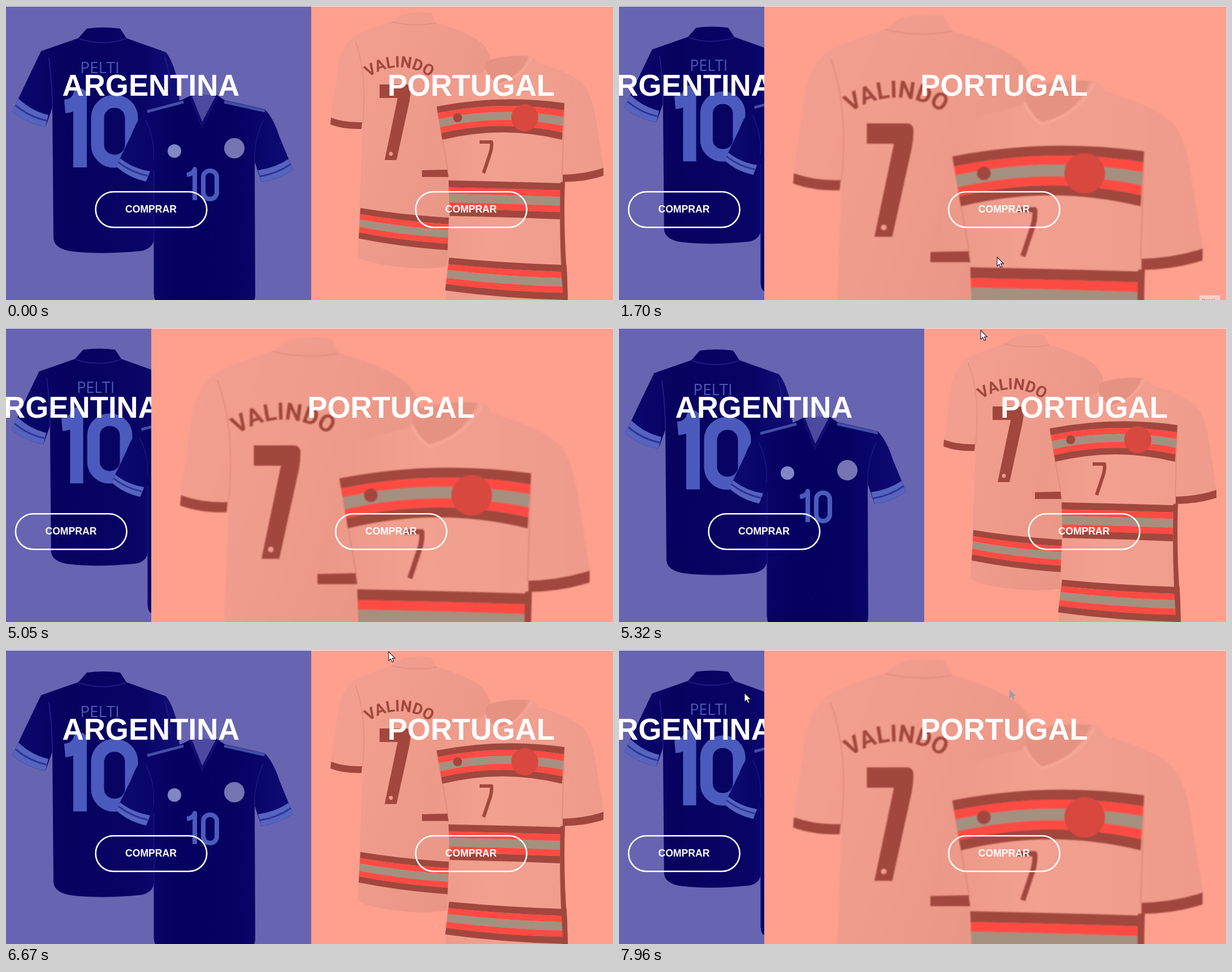
Write an HTML page that moves like this. It is 1074 px wide and 521 px high and loops after 8000 ms.

```html
<!DOCTYPE html>
<html lang="es">
<head>
<meta charset="utf-8">
<title>Camisetas</title>
<style>
  html, body { margin: 0; width: 100%; height: 100%; overflow: hidden; background: #f6f4f8; }
  svg { display: block; width: 100vw; height: 100vh; }
  text { font-family: "Liberation Sans", Arial, sans-serif; }
  .title { font-size: 52.8px; font-weight: 700; fill: #fff; text-anchor: middle; }
  .label { font-size: 17.6px; font-weight: 700; fill: #fff; text-anchor: middle; }
  .pill { fill: none; stroke: #fff; stroke-width: 2.6; }
  .soft { filter: blur(.7px); }
  .digit { fill: none; stroke: #4b5bbd; stroke-linejoin: round; }
  .cuff { fill: #5564be; }
  .trim { fill: #a1473d; }
  .back-name { font-family: "Open Sans", "Noto Sans", sans-serif; font-size: 28px; fill: #4d57b3; text-anchor: middle; }
  .arc-name { font-family: Roboto, "Open Sans", sans-serif; font-size: 28px; font-weight: 700; fill: #a1473d; text-anchor: middle; }
</style>
</head>
<body>
<svg viewBox="0 0 1074 521">
  <defs>
    <linearGradient id="navy" x1="0" x2="1">
      <stop offset="0" stop-color="#0c0970"/><stop offset=".3" stop-color="#07025f"/>
      <stop offset=".75" stop-color="#080465"/><stop offset="1" stop-color="#110e78"/>
    </linearGradient>
    <linearGradient id="navyFront" x1="0" x2="1">
      <stop offset="0" stop-color="#0d0a72"/><stop offset=".35" stop-color="#050160"/>
      <stop offset=".65" stop-color="#060262"/><stop offset="1" stop-color="#0e0b74"/>
    </linearGradient>
    <linearGradient id="rose" x1="0" x2="1" y2=".6">
      <stop offset="0" stop-color="#f3a091"/><stop offset=".5" stop-color="#ef9c8c"/>
      <stop offset="1" stop-color="#e99585"/>
    </linearGradient>
    <linearGradient id="roseFront" x1="0" x2="1">
      <stop offset="0" stop-color="#ec9888"/><stop offset=".4" stop-color="#f2a090"/>
      <stop offset="1" stop-color="#ee9b8b"/>
    </linearGradient>
    <path id="nameArc" d="M640 127Q695 90 752 127"/>
    <path id="arrow" d="M0 0V16L3.8 12.6 6.3 18.3 8.9 17.2 6.5 11.6H11.5Z"/>
  </defs>

  <rect y="1" width="600" height="520" fill="#6765b1"/>
  <g id="leftArt"><g class="soft">
    <path fill="url(#navy)" d="M143 40Q172 36 202 40L213 57 283 82Q296 98 304 135L310 200 262 300V412Q260 430 240 434Q170 441 118 435Q86 431 84 412L82 180 70 214Q38 209 11 187L38 130 62 80 128 57Z"/>
    <path fill="none" stroke="#1f1c86" stroke-width="2" d="M129 58Q172 72 212 58M76 92Q82 140 82 182M281 90Q290 120 290 150"/>
    <path class="cuff" d="M22 164Q45 186 75 193L70 214Q38 209 11 187Z"/>
    <path fill="none" stroke="#2f329a" stroke-width="3" d="M17 176Q42 197 72 203"/>
    <text class="back-name" x="166" y="119">PELTI</text>
    <path class="digit" stroke-width="24" d="M104 178Q126 176 131 158V286"/>
    <rect class="digit" stroke-width="23" x="162" y="169" width="60" height="106" rx="29"/>

    <path fill="url(#navyFront)" d="M312 166L330 157 347 163 372 157 387 167 458 183Q474 200 484 232L508 290Q482 308 452 312L440 276 441 512Q441 524 432 527H272Q262 525 262 512L261 272 248 311Q216 304 195 284L222 228Q234 196 249 186Z"/>
    <path fill="#4c49a0" d="M329 160Q350 154 371 160L347 207Z"/>
    <path fill="none" stroke="#100c70" stroke-width="5" d="M326 160L347 211 374 160"/>
    <path fill="none" stroke="#5967be" stroke-width="5" opacity=".75" d="M250 187L314 170M386 170L458 186"/>
    <path fill="none" stroke="#1b187f" stroke-width="1.5" d="M247 202Q264 236 261 274M455 202Q438 240 440 278M262 290V512"/>
    <path class="cuff" d="M202 270Q224 288 255 293L248 311Q216 304 195 284ZM500 271Q476 287 446 291L452 312Q482 308 508 290Z"/>
    <path fill="none" stroke="#2f329a" stroke-width="3" d="M199 277Q222 295 251 301M504 280Q480 297 449 302"/>
    <circle cx="298" cy="257" r="12" fill="#8186c4"/>
    <circle cx="404" cy="252" r="18" fill="#7675b4"/>
    <path class="digit" stroke-width="8" d="M320 299Q331 298 334 289V344"/>
    <rect class="digit" stroke-width="8" x="349" y="292" width="24" height="50" rx="11.5"/>
  </g></g>
  <g id="leftText">
    <text class="title" x="256.5" y="159">ARGENTINA</text>
    <rect class="pill" x="158.6" y="329.2" width="196.6" height="63" rx="31.5"/>
    <text class="label" x="256.5" y="366">COMPRAR</text>
  </g>

  <rect id="rightBack" y="1" width="1074" height="520" fill="#ffa08f"/>
  <g id="rightArt"><g class="soft">
    <path fill="url(#rose)" d="M682 28L702 14Q728 9 752 12L762 30Q818 46 840 64Q858 80 860 110L800 300 788 460Q755 468 700 463Q635 456 622 443L631 218 630 209Q598 209 574 200Q582 150 587 110Q591 76 612 56Q626 45 682 28Z"/>
    <path fill="none" stroke="#e38e7e" stroke-width="1.5" d="M682 28Q724 38 762 30M618 62Q640 120 631 207"/>
    <path class="trim" d="M575 198Q600 207 630 206L629 218Q598 219 574 210Z"/>
    <text class="arc-name"><textPath href="#nameArc" startOffset="50%">VALINDO</textPath></text>
    <path class="trim" d="M661 139H708Q716 139 716 148Q716 158 714 168L691 273H670L693 163H661Z"/>
    <circle cx="681" cy="262" r="3.4" fill="#ef9c8c"/>
    <g id="backBands"></g>

    <path fill="url(#roseFront)" d="M847 117Q846 98 854 95Q890 84 925 88Q938 91 941 101Q1000 117 1022 139Q1035 154 1042 190L1058 290 1057 301 985 312 991 521H778L785 340 782 302 736 303V290L761 166Q767 140 798 130Z"/>
    <path fill="#e69282" d="M848 116Q846 98 855 96Q890 86 925 89Q908 128 868 139Q852 130 848 116Z"/>
    <path fill="none" stroke="#f5a696" stroke-width="4" d="M847 114Q854 132 868 140Q912 128 930 91"/>
    <path fill="none" stroke="#df8a7a" stroke-width="1.5" d="M762 180Q773 240 782 292M988 174L984 300"/>
    <path class="trim" d="M736 291L781 290 783 303 736 303ZM1057 287V301Q1022 312 985 312V299Q1024 298 1057 287Z"/>
    <g id="frontBands"></g>
    <path class="trim" d="M981 312L989 311Q986 400 993 480L994 521H986Q978 420 981 312Z"/>
    <circle cx="799" cy="198" r="8" fill="#a1473d"/>
    <circle cx="918" cy="198" r="24" fill="#d8483f"/>
    <path fill="none" stroke="#a1473d" stroke-width="6" stroke-linejoin="round" d="M838 241H859Q860 250 857 260L845 296"/>
  </g></g>
  <g id="rightText">
    <text class="title" x="823" y="159">PORTUGAL</text>
    <rect class="pill" x="724.8" y="329.2" width="196.6" height="63" rx="31.5"/>
    <text class="label" x="822.8" y="366">COMPRAR</text>
  </g>

  <g id="tip">
    <rect x="1026.5" y="512.5" width="37.5" height="20" fill="#fff" fill-opacity=".5" stroke="#d9a79d" stroke-opacity=".6"/>
    <text x="1031" y="525" font-size="9" fill="#8a6a64">Panel</text>
  </g>
  <use id="ghost" href="#arrow" x="691" y="70" fill="#98a09f"/>
  <use id="cursor" href="#arrow" fill="#fff" stroke="#1c1c30" stroke-width="1.1" stroke-linejoin="round"/>
</svg>
<script>
  const LOOP = 8000;
  const el = id => document.getElementById(id);
  const lerp = (a, b, k) => a + (b - a) * k;

  // Five stripes between two curves, each given as [left, control, right] heights.
  const COLORS = ['#a1473d', '#fd4b43', '#a59080', '#fd4b43', '#a1473d'];
  const EDGES = [0, .2, .38, .62, .8, 1];
  function bands(x0, x1, top, bottom, skewL = 0, skewR = 0) {
    const edge = k => ({
      l: x0 + skewL * k,
      r: x1 + skewR * k,
      y: top.map((v, i) => lerp(v, bottom[i], k))
    });
    return COLORS.map((color, i) => {
      const a = edge(EDGES[i]), b = edge(EDGES[i + 1]);
      return `<path fill="${color}" d="M${a.l} ${a.y[0]}Q${(a.l + a.r) / 2} ${a.y[1]} ${a.r} ${a.y[2]}` +
        `L${b.r} ${b.y[2]}Q${(b.l + b.r) / 2} ${b.y[1]} ${b.l} ${b.y[0]}Z"/>`;
    }).join('');
  }
  el('backBands').innerHTML = bands(627, 786, [358, 371, 375], [412, 428, 433], -3);
  el('frontBands').innerHTML =
    bands(762, 988, [178, 156, 172], [237, 211, 237], 10, -4) +
    bands(783, 982, [309, 311, 314], [372, 374, 378], 2, -2) +
    bands(784, 992, [446, 456, 459], [504, 519, 521], -7, 2);

  // Pointer moves: start, end, number of steps, way points.
  const MOVES = [
    [1620, 1620, 1, [[730, 505]]],
    [1700, 2120, 7, [[669, 445], [590, 400], [560, 383]]],
    [3510, 4230, 12, [[547, 369], [505, 335], [680, 308], [862, 320]]],
    [4360, 5120, 12, [[840, 290], [720, 110], [650, -30], [650, -30]]],
    [5250, 5730, 7, [[640, 4], [760, 120], [700, -30]]],
    [5880, 6020, 3, [[610, 8], [612, -5], [614, -40]]],
    [6670, 6940, 5, [[677, 3], [740, 80], [838, 106]]],
    [7290, 7560, 5, [[780, 95], [691, 70], [560, 40], [496, 60]]],
    [7820, 7960, 3, [[400, 47], [300, 80], [222, 76]]]
  ];
  // Spans in which the right panel is hovered and wide.
  const WIDE = [[1690, 5120], [5330, 5730], [5880, 6020], [6737, LOOP]];

  function along(points, k) {
    const last = points.length - 1;
    if (!last) return points[0];
    const i = Math.min(Math.floor(k * last), last - 1);
    return points[i].map((v, n) => lerp(v, points[i + 1][n], k * last - i));
  }

  function pointer(t) {
    const move = MOVES.filter(m => m[0] <= t).pop();
    if (!move) return [-50, -50];
    const [start, end, steps, points] = move;
    if (steps === 1) return points[0];
    const gap = (end - start) / (steps - 1);
    const step = Math.min(Math.floor((t - start) / gap), steps - 1);
    return along(points, step / (steps - 1));
  }

  function draw(t) {
    const wide = WIDE.some(([a, b]) => t >= a && t < b);
    const split = wide ? 257 : 540;
    const shift = `translate(${wide ? -141.6 : 0} 0)`;
    el('leftArt').setAttribute('transform', `translate(-27 1) scale(${wide ? .962 : 1}) translate(27 -1)`);
    el('rightArt').setAttribute('transform', `translate(${split} 1) scale(${wide ? 1.5 : 1}) translate(-540 -1)`);
    el('rightBack').setAttribute('x', split);
    el('leftText').setAttribute('transform', shift);
    el('rightText').setAttribute('transform', shift);

    el('tip').setAttribute('opacity', t < 1310 || t >= 1910 ? 0 : t < 1420 ? .5 : 1);
    el('ghost').setAttribute('opacity', t >= 7490 ? 1 : 0);
    const [x, y] = pointer(t);
    el('cursor').setAttribute('transform', `translate(${Math.round(x)} ${Math.round(y)})`);
  }

  const begin = performance.now();
  function tick() {
    draw((performance.now() - begin) % LOOP);
    requestAnimationFrame(tick);
  }
  tick();
</script>
</body>
</html>
```
